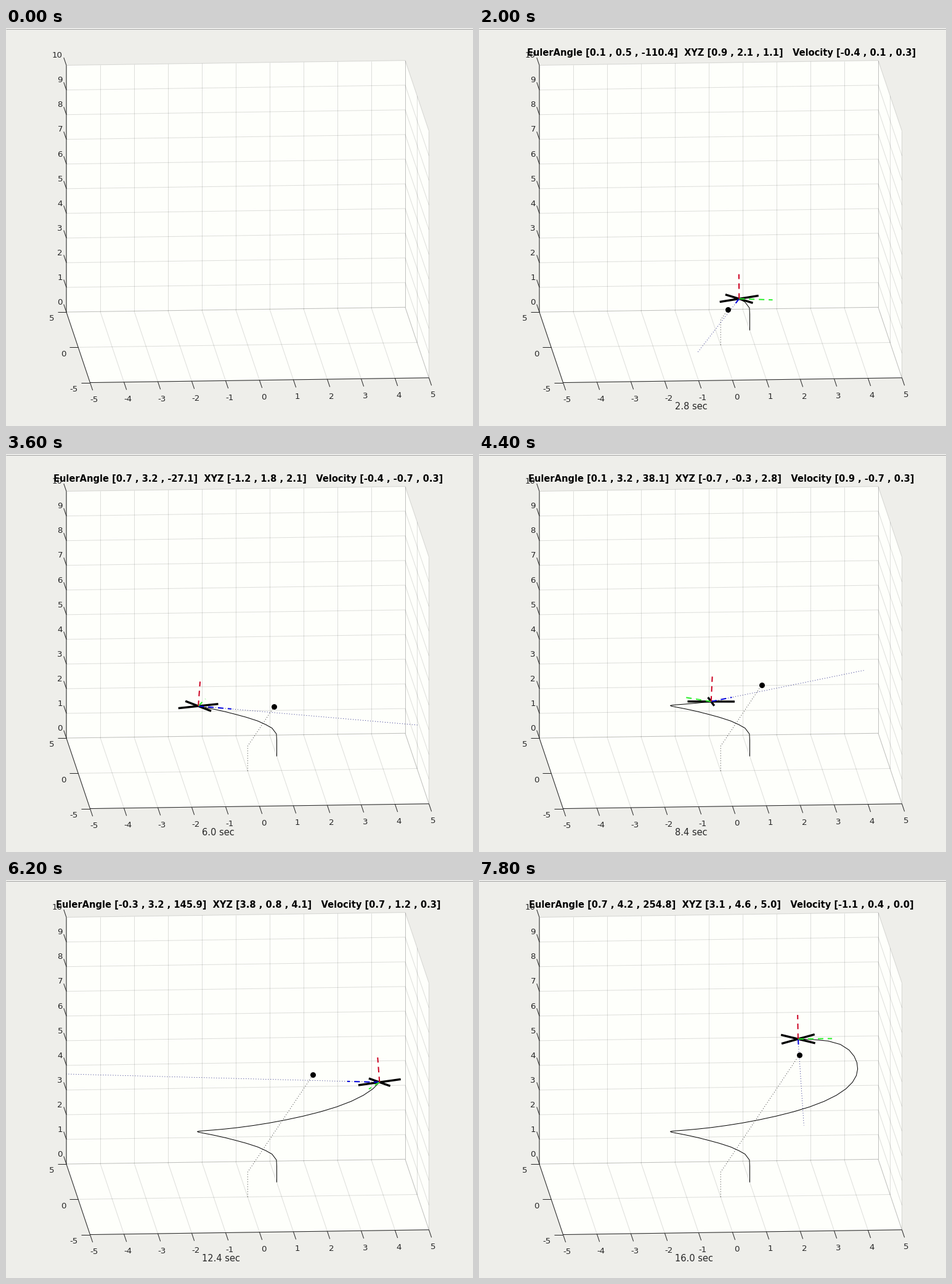
A matplotlib script for the animation above (8 s loop, 758 by 646 pixels).

```python
import numpy as np
import matplotlib.pyplot as plt
from matplotlib.animation import FuncAnimation

W, H, DPI = 758, 646, 100
PT = 72 / DPI  # points per pixel
INK, PAPER, FACE = "#262626", "#eeeeea", "#fefffb"

plt.rcParams["font.family"] = "DejaVu Sans"
fig = plt.figure(figsize=(W / DPI, H / DPI), dpi=DPI, facecolor=PAPER)
ax = fig.add_axes([0, 0, 1, 1])
ax.set_xlim(0, W)
ax.set_ylim(H, 0)
ax.axis("off")

# Orthographic view: screen = ORIGIN + x, y, z times the rows of VIEW
ORIGIN = np.array([392.2, 514.4])
VIEW = np.array([[55.0, -0.78], [-3.85, -11.45], [0, -40.05]])


def project(points):
    return ORIGIN + np.asarray(points, float) @ VIEW


def line(points=((0, 0),), color="k", width=1.0, dash=None, **kw):
    style = "-" if dash is None else (0, tuple(d / width for d in dash))
    pts = np.asarray(points, float)
    return ax.plot(pts[:, 0], pts[:, 1], color=color, lw=width * PT, ls=style,
                   solid_capstyle="butt", dash_capstyle="butt", **kw)[0]


def label(x, y, text, size=13.333, color=INK, **kw):
    return ax.text(x, y, text, size=size * PT, color=color, va="baseline", **kw)


def draw_box():
    ax.fill([0, W, W, 0], [0, 0, 2, 2], color="#ebebe9", lw=0)
    line([(0, 2), (W, 2)], "#a3a3a1")
    line([(0, 3), (W, 3)], "#f8f8f6")
    steps, lo, hi = range(-5, 6), -5, 5
    walls = [
        [(lo, hi, 0), (hi, hi, 0), (hi, hi, 10), (lo, hi, 10)],
        [(hi, lo, 0), (hi, hi, 0), (hi, hi, 10), (hi, lo, 10)],
        [(lo, lo, 0), (hi, lo, 0), (hi, hi, 0), (lo, hi, 0)],
    ]
    for wall in walls:
        ax.fill(*project(wall).T, color=FACE, lw=0)
    grid = [[(x, hi, 0), (x, hi, 10)] for x in steps]
    grid += [[(x, lo, 0), (x, hi, 0)] for x in steps]
    for y in (-5, 0, 5):
        grid += [[(hi, y, 0), (hi, y, 10)], [(lo, y, 0), (hi, y, 0)]]
    for z in range(11):
        grid += [[(lo, hi, z), (hi, hi, z)], [(hi, lo, z), (hi, hi, z)]]
    for ends in grid:
        line(project(ends), INK, alpha=0.15)
    line(project([(lo, hi, 10), (lo, hi, 0), (lo, lo, 0), (hi, lo, 0)]), INK)

    def tick(point, dx, dy):
        p = project(point)
        line([p, p + (dx, dy)], INK)
        return p

    for x in steps:
        px, py = tick((x, lo, 0), 4.2, 12.5)
        label(px + 6.5, py + 31.6, str(x), ha="center")
    for y in (-5, 0, 5):
        px, py = tick((lo, y, 0), -14, 0)
        label(px - 19.5, py + 14.4, str(y), ha="right")
    for z in range(11):
        px, py = tick((lo, hi, z), -4.2, -12.5)
        label(px - 6, py - 12.2, str(z), ha="right")


def ease(u):
    u = np.clip(u, 0, 1)
    return u * u * (3 - 2 * u)


def smooth(k, knots, values):
    """Cubic Hermite curve through a few points, starting from rest."""
    slope = np.gradient(values, knots)
    slope[0] = 0
    k = np.clip(k, knots[0], knots[-1])
    i = min(np.searchsorted(knots, k, side="right") - 1, len(knots) - 2)
    h = knots[i + 1] - knots[i]
    u = (k - knots[i]) / h
    return ((1 + 2 * u) * (1 - u) ** 2 * values[i] + u * (1 - u) ** 2 * h * slope[i]
            + u * u * (3 - 2 * u) * values[i + 1] + u * u * (u - 1) * h * slope[i + 1])


# The craft circles the moving ball: step, bearing in degrees, distance.
STEP = 0.4  # seconds of flight per step
START = 63.43
ORBIT = np.array([(4, START, 2.236), (7, 76.3, 1.96), (10, 108.9, 2.05),
                  (20, 218.1, 2.455), (26, 280.1, 2.345), (34, 373.8, 1.965),
                  (40, 447, 2.22)]).T


def ramp(k):
    return np.clip((k - 4) / 32.5, 0, 1)


def ball(k):
    s = ramp(k)
    return np.array([2.5 * s, 2.5 * s, min(k, 1) + 4 * s])


def bearing(k):
    return smooth(k, ORBIT[0], ORBIT[1])


def craft(k):
    a, r = np.radians(bearing(k)), smooth(k, ORBIT[0], ORBIT[2])
    cx, cy, _ = ball(k)
    height = ease((k - 1) / 5) + 4 * ramp(k - 1)  # follows the ball one step late
    return np.array([cx + r * np.cos(a), cy + r * np.sin(a), height])


def attitude(k):
    lean, brake = ease((k - 4) / 8.2), ease((k - 35) / 4)
    roll = lean * (0.23 + 0.57 * np.cos(np.pi * (k - 10) / 18)) + 0.3 * brake
    pitch = 3.2 * lean + brake
    yaw = bearing(k) - 180 + (180 - START) * (1 - ease((k - 1) / 5))  # turns to the ball
    return np.array([roll, pitch, yaw])


def velocity(k, eps=0.05):
    return (craft(k) - craft(k - eps)) / (eps * STEP)


def rotation(angles):
    (cr, cp, cy), (sr, sp, sy) = np.cos(np.radians(angles)), np.sin(np.radians(angles))
    yaw = np.array([[cy, -sy, 0], [sy, cy, 0], [0, 0, 1]])
    pitch = np.array([[cp, 0, sp], [0, 1, 0], [-sp, 0, cp]])
    roll = np.array([[1, 0, 0], [0, cr, -sr], [0, sr, cr]])
    return yaw @ pitch @ roll


def sight_length(pos, heading):
    """Distance along the heading to the edge of the box."""
    lows, highs = (-5, -5, 0), (5, 5, 10)
    return min(((hi if d > 0 else lo) - p) / d
               for p, d, lo, hi in zip(pos, heading, lows, highs) if abs(d) > 1e-9)


def triple(values):
    return "[" + " , ".join(f"{v:.1f}" for v in values) + "]"


draw_box()
trail = line()
ball_trail = line(width=0.8, dash=(1, 3))
sight = line(color="#000070", width=0.8, dash=(1, 3))
arms = [line(width=3.4) for _ in range(2)]
axes3 = [line(color=c, width=2, dash=(9, 7)) for c in ("#0000dd", "#2af02a", "#cc0020")]
dot = ax.plot([0], [0], "o", color="k", ms=9 * PT, mew=0)[0]
title = label(393.2, 45, "", 14.667, "k", weight="bold", ha="center")
clock = label(317.6, 619, "", 14.667)
moving = [trail, ball_trail, sight, *arms, *axes3, dot, title, clock]

# Playback pace: tenths of a second against steps shown
PACE = np.array([(8, 0), (13, 2), (18, 6), (34, 14), (44, 21), (78, 40)]).T


def put(artist, points):
    artist.set_data(*project(points).T)


def update(frame):
    started = frame >= PACE[0, 0]
    for artist in moving:
        artist.set_visible(started)
    k = int(np.interp(frame, *PACE) + 0.5)
    pos, rot = craft(k), rotation(attitude(k))
    put(trail, [craft(i) for i in range(k + 1)])
    put(ball_trail, [ball(i) for i in range(k + 1)])
    put(dot, [ball(k)])
    put(sight, [pos, pos + sight_length(pos, rot[:, 0]) * rot[:, 0]])
    for arm, side in zip(arms, (1, -1)):
        reach = 0.7 * (rot[:, 0] + side * rot[:, 1]) / np.sqrt(2)
        put(arm, [pos - reach, pos + reach])
    for axis, direction in zip(axes3, rot.T):
        put(axis, [pos, pos + direction])
    last = max(k - 1, 0)  # the readout runs one step behind
    title.set_text(f"EulerAngle {triple(attitude(last))}  XYZ {triple(craft(last))}"
                   f"   Velocity {triple(velocity(last))}")
    clock.set_text(f"{k * STEP:.1f} sec")
    return moving


anim = FuncAnimation(fig, update, frames=80, interval=100, repeat=True,
                     repeat_delay=0, blit=False)
plt.show()
```
